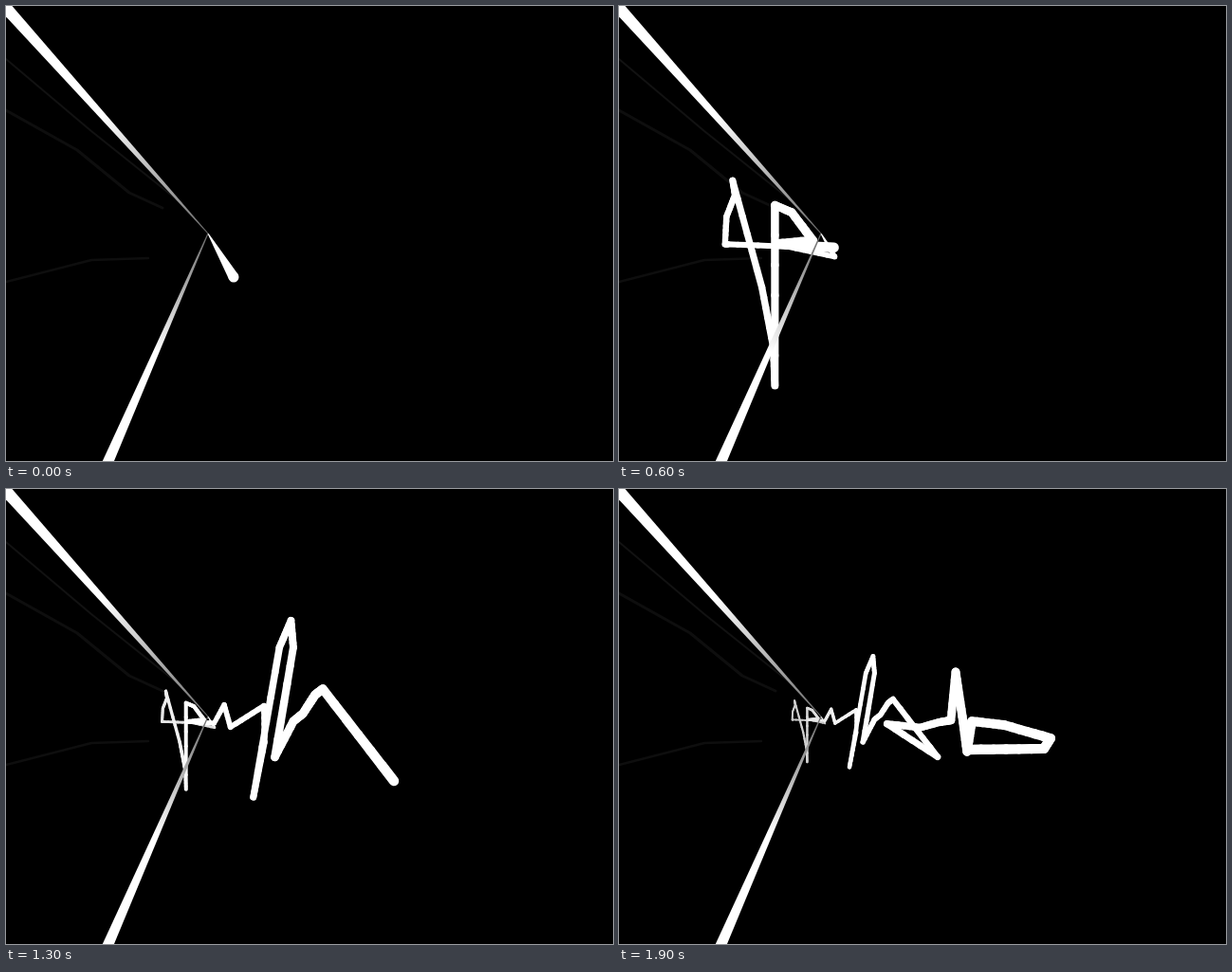
Animation, 640 px wide and 480 px high, one loop 2 s. Source, as an HTML page with a canvas:

```html
<!DOCTYPE html>
<html lang="en">
<head>
<meta charset="utf-8">
<title>Receding scribble</title>
<style>
  html, body { margin: 0; width: 100%; height: 100%; overflow: hidden; background: black; }
  canvas { display: block; }
</style>
</head>
<body>
<canvas id="stage" width="640" height="480"></canvas>
<script>
const stage = document.getElementById('stage');
const ctx = stage.getContext('2d');
const LOOP = 2000, STEP = 100, SLOWDOWN = 1500, PEN = 10.5, PIECES = 6;
const eye = { x: 213, y: 240 };

// Everything drawn shrinks towards the eye, more slowly near the end.
const scaleAt = t =>
  0.9 ** (Math.min(t, SLOWDOWN) / STEP) * 0.938 ** (Math.max(t - SLOWDOWN, 0) / STEP);

// One pen leg per step; coordinates are as they look at the time `seen`.
const letters = [
  { seen: 400, legs: ['170,257 92,254', '88,254 90,218 101,190 98,171', '136,310 151,388 153,438', '153,203'] },
  { seen: 800, legs: ['188,222 206,246', '175,249 224,252', '242,219 253,259', '313,221 314,286'] },
  { seen: 1100, legs: ['272,345', '306,150 321,115', '324,150 300,293'] },
  { seen: 1300, legs: ['303,245 313,237 326,217', '334,211 409,308'] },
  { seen: 1500, legs: ['303,250', '348,255 373,248'] },
  { seen: 1900, legs: ['350,244', '355,193 362,240', '367,277 372,245 406,249', '455,263 448,274 368,275'] }
];

const start = { t: 0, x: 27, y: 46 };
const distance = (a, b) => Math.hypot(b.x - a.x, b.y - a.y);
const mix = (a, b, k) => a + (b - a) * k;
const between = (a, b, k) => ({ t: mix(a.t, b.t, k), x: mix(a.x, b.x, k), y: mix(a.y, b.y, k) });

// Lay out the legs around the eye and time their points by the distance covered.
function buildPath() {
  const path = [start];
  let begin = 0;
  for (const { seen, legs } of letters) {
    for (const leg of legs) {
      let length = 0, last = path[path.length - 1];
      const points = leg.split(' ').map(pair => {
        const [x, y] = pair.split(',').map(Number);
        const point = { x: (x - eye.x) / scaleAt(seen), y: (y - eye.y) / scaleAt(seen) };
        length += distance(last, point);
        last = point;
        return { ...point, length };
      });
      path.push(...points.map(p => ({ x: p.x, y: p.y, t: begin + STEP * p.length / length })));
      begin += STEP;
    }
  }
  return path;
}
const path = buildPath();

function line(points, width, color) {
  ctx.lineWidth = width;
  ctx.strokeStyle = color;
  ctx.stroke(new Path2D('M' + points));
}

function wedge(x, y, width, fill) {
  const len = distance(eye, { x, y }), r = width / 2;
  const nx = (eye.y - y) / len, ny = (x - eye.x) / len;
  ctx.fillStyle = fill;
  ctx.beginPath();
  ctx.moveTo(eye.x + nx / 2, eye.y + ny / 2);
  ctx.lineTo(x + nx * r, y + ny * r);
  ctx.lineTo(x - nx * r, y - ny * r);
  ctx.lineTo(eye.x - nx / 2, eye.y - ny / 2);
  ctx.fill();
  ctx.beginPath();
  ctx.arc(x, y, r, 0, Math.PI * 2);
  ctx.fill();
}

function ray(x, y, width) {
  const shade = ctx.createLinearGradient(eye.x, eye.y, x, y);
  shade.addColorStop(0, 'dimgray');
  shade.addColorStop(0.5, 'white');
  wedge(x, y, width, shade);
}

function drawPath(now) {
  const scale = scaleAt(now);
  for (let i = 1; i < path.length; i++) {
    for (let j = 0; j < PIECES; j++) {
      const a = between(path[i - 1], path[i], j / PIECES);
      const b = between(path[i - 1], path[i], (j + 1) / PIECES);
      if (b.t > now + 0.01) return;
      const width = PEN * scale / scaleAt(b.t);
      ctx.lineWidth = width;
      ctx.strokeStyle = `hsl(0 0% ${Math.min(100, 60 + width * 10)}%)`;
      ctx.beginPath();
      ctx.moveTo(eye.x + a.x * scale, eye.y + a.y * scale);
      ctx.lineTo(eye.x + b.x * scale, eye.y + b.y * scale);
      ctx.stroke();
    }
  }
}

function draw(now) {
  ctx.clearRect(0, 0, stage.width, stage.height);
  ctx.lineCap = ctx.lineJoin = 'round';
  line('0 56L90 132L185 208', 2, '#121212');
  line('0 110L75 152L130 197L165 213', 3, '#0e0e0e');
  line('0 291L90 268L150 266', 2.5, '#0e0e0e');

  const scale = scaleAt(now);
  wedge(eye.x + start.x * scale, eye.y + start.y * scale, 11 * scale, 'white');
  drawPath(now);
  ray(-9, -8, 13);
  ray(104, 489, 11.5);
}

const origin = performance.now();
function tick() {
  const elapsed = (performance.now() - origin) % LOOP;
  draw(Math.floor(elapsed / STEP) * STEP);
  requestAnimationFrame(tick);
}
tick();
</script>
</body>
</html>
```
